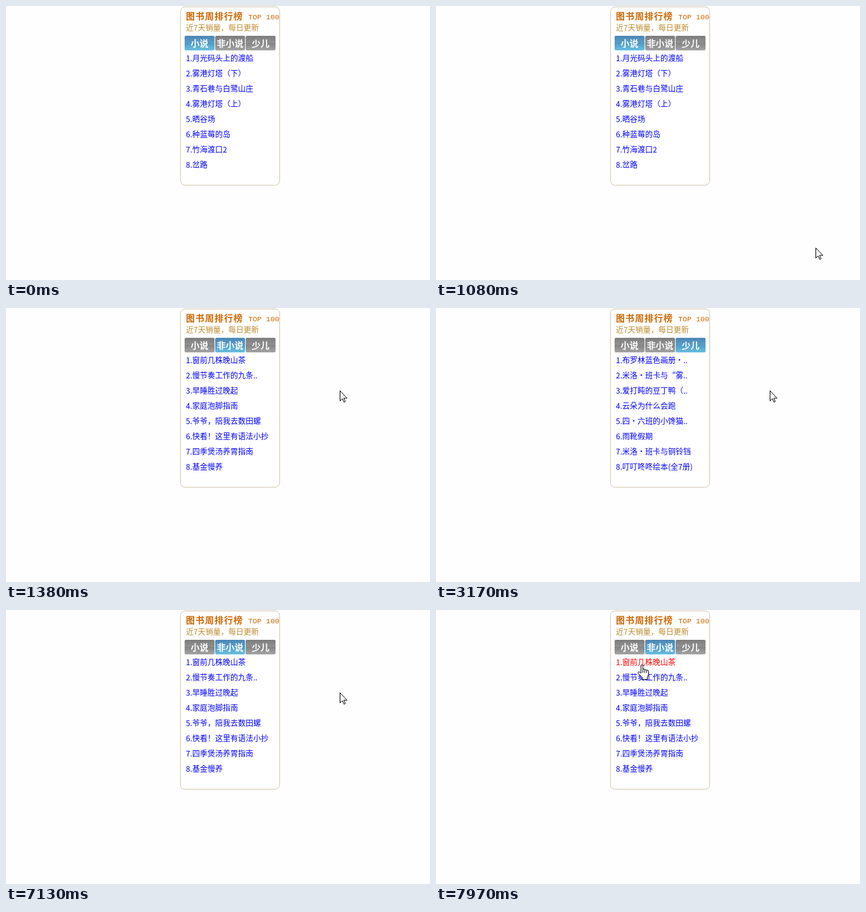
These frames come from a looping animation (667 px wide and 432 px high, 8000 ms). An HTML page:

```html
<!DOCTYPE html>
<html lang="zh-CN">
<head>
<meta charset="utf-8">
<title>图书周排行榜</title>
<style>
html, body { margin: 0; width: 100%; height: 100%; overflow: hidden; background: #fefefe; }
svg { display: block; font: 12px "Noto Sans CJK SC", "Noto Sans CJK", sans-serif; }
.title { font-size: 14px; font-weight: bold; letter-spacing: 1px; fill: #c60; }
.top { font: 11.67px "Liberation Mono", monospace; fill: #c60; }
.note { fill: #bd8a2c; }
.tab text { font-size: 14px; font-weight: bold; fill: #fff; text-anchor: middle; }
.items { fill: #00f; }
.cursor { fill: #fff; stroke: #000; stroke-linejoin: round; }
</style>
</head>
<body>
<svg id="stage" width="667" height="432" viewBox="0 0 667 432">
  <defs>
    <linearGradient id="gray" x2="0" y2="1">
      <stop stop-color="#7c7c7c"/><stop offset=".5" stop-color="#929292"/>
      <stop offset=".5" stop-color="#848484"/><stop offset="1" stop-color="#a4a4a4"/>
    </linearGradient>
    <linearGradient id="blue" x2="0" y2="1">
      <stop stop-color="#4a86b4"/><stop offset=".5" stop-color="#5c9fc9"/>
      <stop offset=".5" stop-color="#4c9bc8"/><stop offset="1" stop-color="#6abfe0"/>
    </linearGradient>
  </defs>
  <rect x="274.5" y="1.5" width="156" height="281" rx="7" fill="#fff" stroke="#d2c5ad"/>
  <text class="title" x="283" y="21">图书周排行榜</text>
  <text class="top" x="381" y="21">TOP 100</text>
  <text class="note" x="283" y="39">近7天销量，每日更新</text>
  <g id="tabs"></g>
  <g id="items" class="items"></g>
  <path id="arrow" class="cursor" d="M.5.5V16.5L4.2 13 6.7 18.5 8.8 17.6 6.4 12.2H11.5Z"/>
  <path id="hand" class="cursor" d="M5.5 13V2a1.5 1.5 0 0 1 3 0V8.5a1.5 1.5 0 0 1 3 0V9.5a1.5 1.5 0 0 1 3 0V10.5a1.5 1.5 0 0 1 3 0V15.5L15.5 20V23.5H7.5V20.5L1 14Q.2 12 2 11.5 3.500 11.500 5.500 14M8.500 8.500V13M11.500 9.500V13M14.500 10.500V13"/>
</svg>
<script>
const $ = id => document.getElementById(id);
const LOOP = 8000;
const tabNames = ["小说", "非小说", "少儿"];
const lists = [
  ["月光码头上的渡船", "雾港灯塔（下）", "青石巷与白鹭山庄", "雾港灯塔（上）",
   "晒谷场", "种蓝莓的岛", "竹海渡口2", "岔路"],
  ["窗前几株晚山茶", "慢节奏工作的九条..", "早睡胜过晚起", "家庭泡脚指南",
   "爷爷，陪我去数田螺", "快看！这里有语法小抄", "四季煲汤养胃指南", "基金慢养"],
  ["布罗林蓝色画册・..", "米洛・班卡与“雾..", "爱打盹的豆丁鸭（..", "云朵为什么会跑",
   "四・六班的小馋猫..", "雨靴假期", "米洛・班卡与铜铃铛", "叮叮咚咚绘本(全7册)"]
];

// [start ms, active tab]
const tabSteps = [[0, 0], [1160, 1], [3170, 2], [5170, 0], [7130, 1]];
// [start ms, x, y, hand over a link]
const cursorSteps = [
  [0, -50, -50], [550, 593, 403], [620, 593, 400], [700, 594, 399],
  [1080, 597, 381], [1160, 585, 322], [1230, 560, 235], [1300, 534, 158], [1380, 525, 130],
  [7590, 519, 142], [7670, 482, 161], [7740, 428, 164], [7820, 374, 138], [7890, 338, 93],
  [7970, 317, 86, true]
];

function add(parent, name, attrs, text = "") {
  const el = document.createElementNS("http://www.w3.org/2000/svg", name);
  for (const key in attrs) el.setAttribute(key, attrs[key]);
  el.textContent = text;
  return parent.appendChild(el);
}

const tabs = tabNames.map((name, i) => {
  const g = add($("tabs"), "g", { class: "tab" });
  const x = 281 + 48 * i;
  const rect = add(g, "rect", { x, y: 47, width: 47, height: 23, rx: 2 });
  add(g, "text", { x: x + 23.5, y: 64 }, name);
  return rect;
});
const rows = lists[0].map((_, i) => add($("items"), "text", { x: 283, y: 87 + 24 * i }));

const stepAt = (steps, t) => steps.findLast(s => s[0] <= t);
let shown = -1;

function showTab(active) {
  if (active === shown) return;
  shown = active;
  tabs.forEach((rect, i) => rect.setAttribute("fill", i === active ? "url(#blue)" : "url(#gray)"));
  rows.forEach((row, i) => row.textContent = `${i + 1}.${lists[active][i]}`);
}

function draw(now) {
  const t = now % LOOP;
  showTab(stepAt(tabSteps, t)[1]);
  const [, x, y, over] = stepAt(cursorSteps, t);
  for (const [id, on] of [["arrow", !over], ["hand", over]]) {
    $(id).setAttribute("transform", `translate(${x} ${y})`);
    $(id).setAttribute("visibility", on ? "visible" : "hidden");
  }
  rows[0].setAttribute("fill", over ? "#f00" : "#00f");
}

const start = performance.now();
function frame() {
  draw(performance.now() - start);
  requestAnimationFrame(frame);
}
frame();
</script>
</body>
</html>
```
